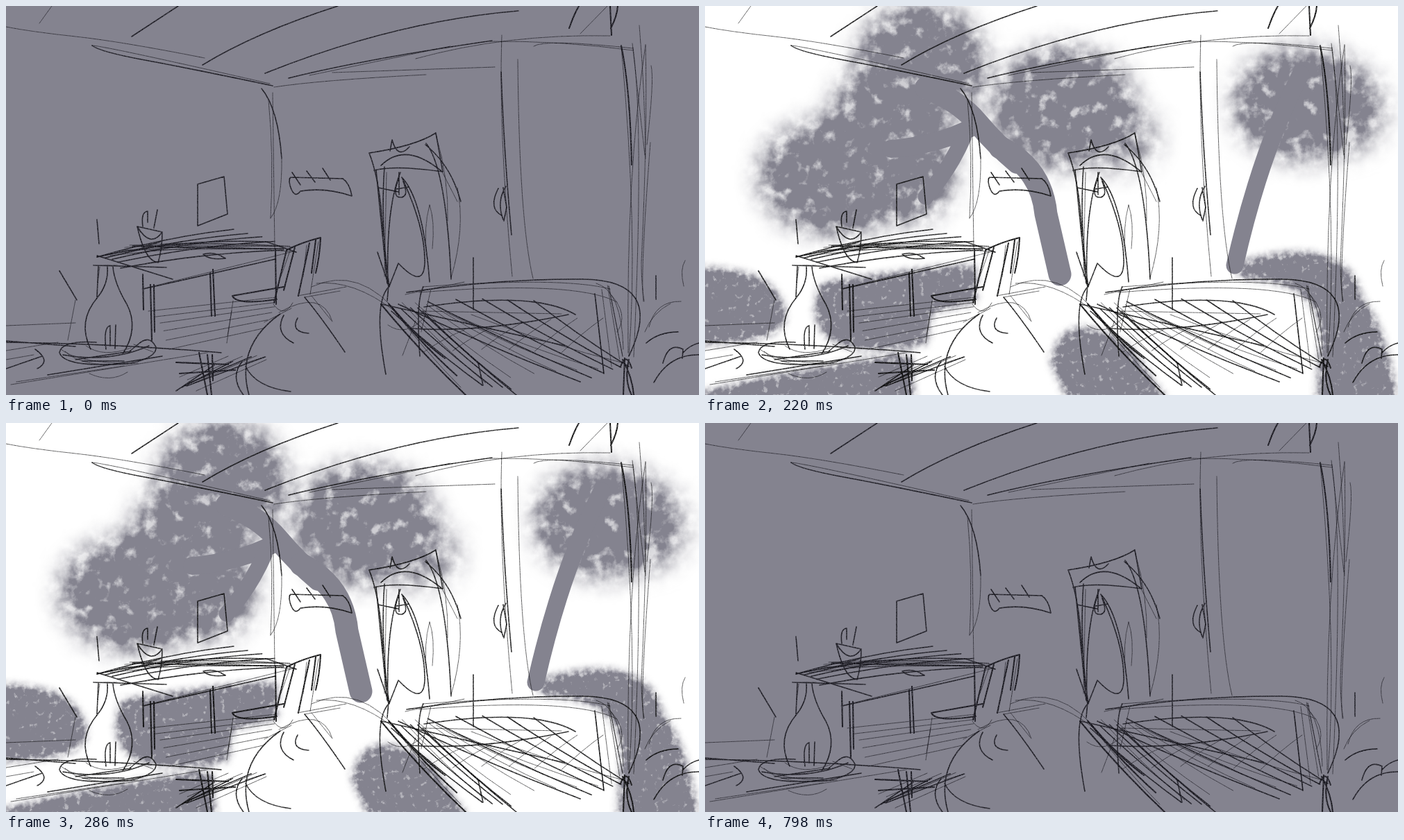
An HTML page for the animation above (1.11 s loop, 998 by 561 pixels).

```html
<!DOCTYPE html>
<html lang="en">
<head>
<meta charset="utf-8">
<title>Room sketch</title>
<style>
html, body { margin: 0; width: 100%; height: 100%; overflow: hidden; background: #84838f; }
svg { display: block; width: 100%; height: 100%; }
#trees { fill: #84838f; }
.limb { fill: none; stroke: #84838f; stroke-linecap: round; }
#ink { fill: none; stroke-linecap: round; stroke-linejoin: round; }
</style>
</head>
<body>
<svg viewBox="0 0 998 561" preserveAspectRatio="none">
  <defs id="defs"></defs>
  <rect id="paper" width="998" height="561"/>
  <g id="trees">
    <g filter="url(#leaf)">
      <ellipse cx="311" cy="84" rx="88" ry="82"/>
      <ellipse cx="267" cy="166" rx="82" ry="78"/>
      <ellipse cx="190" cy="246" rx="108" ry="78"/>
      <ellipse cx="295" cy="238" rx="58" ry="68"/>
      <ellipse cx="516" cy="146" rx="98" ry="82"/>
      <ellipse cx="600" cy="190" rx="50" ry="45" opacity=".55"/>
      <ellipse cx="862" cy="142" rx="96" ry="76"/>
      <ellipse cx="925" cy="150" rx="52" ry="58" opacity=".55"/>
    </g>
    <g filter="url(#bush)">
      <path d="M-30 380Q112 375 113 450Q108 486 -30 486Z"/>
      <path d="M-30 566Q100 530 294 503L300 590H-30Z"/>
      <path d="M168 402Q300 380 388 376V425L324 440 318 485Q170 515 160 440Z"/>
      <path d="M765 374Q920 325 944 422Q985 475 996 590H882L888 490Q898 395 775 391Z"/>
      <path d="M500 512Q520 430 612 495L676 590H535Z"/>
    </g>
    <g class="limb">
      <path d="M318 118Q365 136 392 168T450 226" stroke-width="32"/>
      <path d="M425 204Q485 235 491 300L511 387" stroke-width="33"/>
      <path d="M268 206Q335 201 386 174" stroke-width="26"/>
      <path d="M318 275Q352 236 372 190" stroke-width="23"/>
      <path d="M858 98Q800 210 763 374" stroke-width="25"/>
    </g>
  </g>
  <g id="ink" filter="url(#grain)"></g>
</svg>
<script>
const LOOP = 1110, FLASH_ON = 220, FLASH_OFF = 330;
const $ = id => document.getElementById(id);

// Cloudy paint edge: blurred shape multiplied by noise.
function cloud(id, blur, freq, mul, add) {
  return `<filter id="${id}" filterUnits="userSpaceOnUse" x="-60" y="-60" width="1120" height="690" color-interpolation-filters="sRGB">
    <feGaussianBlur stdDeviation="${blur}" result="soft"/>
    <feTurbulence type="fractalNoise" baseFrequency="${freq}" numOctaves="5" seed="4"/>
    <feColorMatrix values="0 0 0 0 0 0 0 0 0 0 0 0 0 0 0 1.7 0 0 0 -.35" result="noise"/>
    <feComposite in="soft" in2="noise" operator="arithmetic" k1="${mul}" k2="${add}" result="mask"/>
    <feFlood flood-color="#84838f"/>
    <feComposite in2="mask" operator="in"/>
  </filter>`;
}
const grain = `<filter id="grain" filterUnits="userSpaceOnUse" x="0" y="0" width="998" height="561" color-interpolation-filters="sRGB">
    <feTurbulence type="fractalNoise" baseFrequency=".6" numOctaves="2"/>
    <feColorMatrix values="0 0 0 0 0 0 0 0 0 0 0 0 0 0 0 1 0 0 0 0" result="noise"/>
    <feComposite in="SourceGraphic" in2="noise" operator="arithmetic" k1=".9" k2=".5"/>
  </filter>`;
$("defs").innerHTML = cloud("leaf", 19, .05, 1.7, .4) + cloud("bush", 7, .12, 1.6, .6) + grain;

function pen(width, opacity, d) {
  const path = document.createElementNS("http://www.w3.org/2000/svg", "path");
  path.setAttribute("d", d);
  path.setAttribute("stroke-width", width);
  path.setAttribute("stroke-opacity", opacity);
  $("ink").append(path);
}
const bold = d => pen(2.1, .9, d);
const firm = d => pen(1.6, .87, d);
const light = d => pen(1, .62, d);

// Strokes swept from one line to another, each with a slight bow.
function hatch(style, count, from, to, bow = 0) {
  for (let i = 0; i < count; i++) {
    const k = count > 1 ? i / (count - 1) : 0;
    const [x, y, u, v] = from.map((n, j) => n + (to[j] - n) * k + (i && i < count - 1 ? 5 * Math.sin(7 * i + 3 * j) : 0));
    style(`M${x} ${y}Q${(x + u) / 2} ${(y + v) / 2 + bow} ${u} ${v}`);
  }
}

// ceiling
firm("M248 0Q216 21 181 44M283 85Q360 38 478 0M373 97Q560 22 738 7M407 104Q520 76 700 50");
firm("M124 57Q135 66 200 78T384 115");
light("M66 0 48 25M0 30Q35 37 100 44T286 75M124 57Q140 57 380 112M386 117Q450 107 605 99M470 96 704 88M437 100 640 58");
light("M697 51Q800 50 903 64M760 58Q775 47 903 61M590 76Q720 40 870 43M866 0 827 40");
bold("M825 0Q818 12 811 32M870 0 872 42M881 0Q880 15 871 32");

// wall corner and door
firm("M368 119Q392 148 397 220M713 95Q717 210 728 330");
light("M397 220Q398 285 381 306M384 125 387 350M378 135Q386 220 381 306M714 42Q709 180 729 390M737 77Q739 310 759 393");
firm("M709 263Q694 292 714 302M720 260Q706 282 716 308M716 262 721 290 717 310");

// right column
bold("M886 57Q899 120 901 229");
light("M902 54 920 215M912 28Q920 120 921 220M929 86Q934 105 923 200M886 58Q911 330 897 505M921 56Q893 240 896 500");
light("M928 197Q913 390 918 426M921 56Q924 180 915 370Q915 400 919 426M903 60Q919 180 904 506");

// arched cabinet
firm("M523 212Q590 202 619 183L629 239Q560 229 530 237M523 212Q540 255 543 332M553 209 556 193Q564 222 581 203");
firm("M540 230Q575 195 627 238M545 232Q539 320 552 405M533 237 549 400M536 262 565 268M550 402Q547 290 568 240");
firm("M570 247Q601 280 610 398M570 247Q604 320 603 370Q602 410 565 371L552 404M605 198Q634 235 641 394M604 200Q641 230 655 282");
firm("M566 247Q555 276 568 276T572 253M566 240V272M562 264 580 261M535 355 551 402 549 425M551 405Q528 430 547 531");
light("M610 287Q601 320 606 360M610 287Q618 310 614 350M650 262Q662 320 641 392M619 185Q638 250 636 310M627 237 650 282M548 240 545 390");

// shelf, picture, pot
firm("M410 247 485 249Q495 256 498 274 460 261 424 267 416 278 410 262 406 250 410 247M412 240 424 258M433 238 445 254M456 234 467 251");
firm("M276 257 314 246 319 300 276 317Z");
firm("M189 318 225 326Q225 350 219 370Q200 368 189 318Q208 350 225 326M197 318Q194 297 204 296V312M218 294 213 320M131 308 134 343M196 348 222 340");

// desk
hatch(firm, 5, [131, 362, 328, 322], [165, 378, 400, 352], -9);
hatch(light, 5, [150, 360, 390, 346], [182, 346, 418, 355], -8);
firm("M131 362Q250 335 375 340L418 355M126 374 231 377M131 360 240 394M182 346Q300 350 400 350M284 358Q300 353 316 364 293 367 284 358M198 408 388 365");
light("M196 408 410 355M182 358 260 342M170 352 370 350");
bold("M197 387 198 438M208 402 210 482M213 402 214 470M294 385 296 447M298 380 301 447M388 350 389 430");
hatch(light, 6, [205, 440, 390, 420], [235, 495, 370, 465]);

// chair
bold("M404 352 386 428M416 348 400 410M404 352Q425 341 453 334 452 360 446 385M437 342 421 418M446 338 440 385M326 418 400 405M326 418Q332 432 390 423");
light("M433 345 428 390M450 340 438 416M327 425 318 486M325 440 319 475M420 418 490 405M410 350 396 390");

// vase and tray
firm("M146 376Q148 400 132 420 102 455 122 495M154 376Q156 400 174 430 192 465 168 502M133 375 131 420M144 495Q140 463 150 461V490M158 460 157 494");
firm("M130 485Q80 482 77 500 85 523 180 515 217 507 216 492 207 473 190 488L178 498M100 510 180 498M82 503Q150 515 206 490M110 512H170");
light("M140 374H160M115 490Q140 508 180 493M85 498Q110 524 190 515M120 530Q150 544 175 528M184 488 212 499M135 376 132 400M79 495Q100 512 160 515");

// floor and stool
firm("M77 382 102 424M0 485Q160 487 310 500M0 483 100 491M42 495Q66 512 45 523M0 523 52 505M60 532 225 505");
light("M100 424 89 482M0 461 100 457M0 497 75 485M0 510 40 503M7 546 290 500M15 542 170 519");
bold("M278 500 290 561M290 503 296 561M297 503 298 540M245 514 320 517M250 530 330 525");
hatch(firm, 4, [245, 555, 300, 518], [260, 548, 373, 506]);
hatch(light, 4, [250, 535, 320, 505], [274, 555, 375, 510]);

// cushion
firm("M395 444Q330 490 350 561M400 446Q386 472 414 486M420 450Q409 470 436 472M430 420Q455 450 488 499M345 520Q360 550 410 556M340 513Q322 535 342 561");
light("M393 442Q455 407 470 455M440 418 469 454M440 405Q510 372 570 450M447 400Q500 394 560 440M385 430Q400 451 413 428M430 420 481 411M344 515 374 506M372 456 411 436");

// sofa
firm("M577 413Q710 393 830 394T897 505M601 405Q590 425 596 505M673 363V438M602 434Q760 410 820 445M582 465Q680 472 810 445");
light("M600 405Q800 390 870 408M612 408 598 470M600 440 800 444M575 416 660 398M595 413Q820 395 880 427M850 400Q887 410 889 495M868 404 888 505M870 415Q898 445 880 470");
hatch(bold, 3, [540, 430, 662, 561], [556, 435, 632, 508], 8);
hatch(firm, 5, [555, 440, 686, 547], [600, 440, 735, 561], 6);
hatch(firm, 6, [565, 430, 827, 542], [760, 425, 897, 520], 6);
hatch(light, 8, [550, 428, 655, 550], [670, 445, 890, 515], 8);
hatch(light, 6, [600, 500, 660, 467], [800, 500, 860, 450], -4);
hatch(light, 4, [848, 415, 861, 530], [868, 404, 888, 505]);
light("M550 460Q575 478 602 450M571 504 590 454");
firm("M622 463 680 515 687 547M541 430 805 490M848 415 861 530");

// column foot and plants
bold("M888 510Q902 535 904 561M891 508 889 561M897 510Q890 540 901 561M885 520Q893 498 901 522");
firm("M936 389V423");
light("M978 367Q970 380 976 404M926 463Q935 425 972 426M922 486Q940 470 968 470M920 470Q930 443 957 429");
firm("M933 543Q955 502 998 503M946 515Q954 484 975 495L974 508M975 500Q985 489 998 486M922 486Q940 470 968 470");

function draw(time) {
  const t = time % LOOP, flash = t >= FLASH_ON && t < FLASH_OFF;
  $("paper").setAttribute("fill", flash ? "#fff" : "#84838f");
  $("trees").setAttribute("visibility", flash ? "visible" : "hidden");
  $("ink").setAttribute("stroke", flash ? "#161618" : "#2c2b38");
}

const start = performance.now();
function tick() {
  draw(performance.now() - start);
  requestAnimationFrame(tick);
}
draw(0);
requestAnimationFrame(tick);
</script>
</body>
</html>
```
